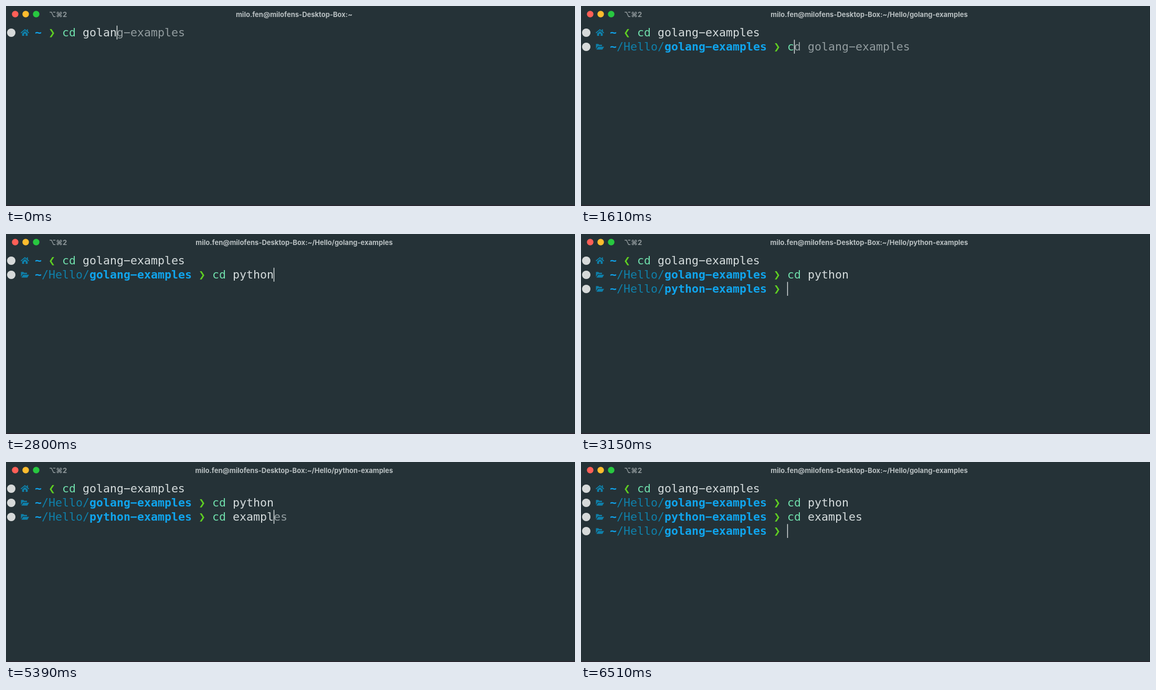
An HTML page with a canvas for the animation above (6580 ms loop, 1084 by 382 pixels).

```html
<!DOCTYPE html>
<html lang="en">
<head>
<meta charset="utf-8">
<title>Terminal</title>
<style>
  html, body { margin: 0; width: 100%; height: 100%; overflow: hidden; background: #253237; }
  canvas { display: block; }
</style>
</head>
<body>
<canvas id="stage" width="1084" height="382"></canvas>
<script>
const ctx = document.getElementById('stage').getContext('2d');
const LOOP = 6580, CELL = 13, LEFT = 3, TOP = 37, ROW = 27;
const MONO = '21.59px "DejaVu Sans Mono", "DejaVu Sans", monospace';
const UI = 'bold 13px Inter, "DejaVu Sans", sans-serif';
const HOST = 'milo.fen@milofens-Desktop-Box:~';
const C = {
  bg: '#253237', text: '#d5dcdd', hint: '#929c9f', cmd: '#70dfac', arrow: '#5fcf22',
  path: '#0f80aa', anchor: '#10a4ec', badge: '#d6d9d9', title: '#b9c0c2', tab: '#90999c'
};

// Each prompt: time of the new line, time the prompt shows, folder, and
// edits as [time, typed, hint].
const prompts = [
  { open: -1, ready: -1, dir: '', edits: [
    [0, 'cd golan', 'g-examples'], [70, 'cd golang', '-examples'], [840, 'cd golang-examples', '']
  ] },
  { open: 1120, ready: 1190, dir: 'golang-examples', edits: [
    [1540, 'c', 'd golang-examples'], [1680, 'cd', ' golang-examples'], [1820, 'cd ', 'golang-examples'],
    [2030, 'cd p', ''], [2240, 'cd py', ''], [2380, 'cd pyt', ''], [2450, 'cd pyth', ''],
    [2590, 'cd pytho', ''], [2730, 'cd python', '']
  ] },
  { open: 3080, ready: 3150, dir: 'python-examples', edits: [
    [3850, 'c', 'd python'], [3990, 'cd', ' python'], [4130, 'cd ', 'python'],
    [4550, 'cd e', 'xamples'], [4690, 'cd ex', 'amples'], [4760, 'cd exa', 'mples'],
    [4900, 'cd exam', 'ples'], [5040, 'cd examp', 'les'], [5110, 'cd exampl', 'es'],
    [5460, 'cd example', 's'], [5600, 'cd examples', '']
  ] },
  { open: 5950, ready: 6020, dir: 'golang-examples', edits: [] }
];
const VI_MODE = 840;

const colX = col => LEFT + col * CELL;
const rowY = row => TOP + row * ROW;

function dot(x, y, r, color) {
  ctx.fillStyle = color;
  ctx.beginPath();
  ctx.arc(x, y, r, 0, Math.PI * 2);
  ctx.fill();
}

function shape(color, ...points) {
  ctx.fillStyle = color;
  ctx.beginPath();
  points.forEach(([x, y]) => ctx.lineTo(x, y));
  ctx.closePath();
  ctx.fill();
}

// The terminal face has a wide hyphen, so the minus glyph stands in for it.
function write(str, col, row, color, bold) {
  ctx.font = (bold ? 'bold ' : '') + MONO;
  ctx.textAlign = 'left';
  ctx.fillStyle = color;
  ctx.fillText(str.replace(/-/g, '\u2212'), colX(col), rowY(row) + 21);
}

function label(str, x, align, color) {
  ctx.font = UI;
  ctx.textAlign = align;
  ctx.fillStyle = color;
  ctx.fillText(str, x, 20.5);
}

function house(row) {
  const y = rowY(row);
  ctx.strokeStyle = C.path;
  ctx.lineWidth = 1.8;
  ctx.beginPath();
  ctx.moveTo(28.5, y + 14.5);
  ctx.lineTo(36, y + 8.2);
  ctx.lineTo(43.5, y + 14.5);
  ctx.stroke();
  ctx.fillStyle = C.path;
  ctx.fillRect(39.6, y + 7.6, 2.2, 4);
  shape(C.path, [36, y + 11], [41.3, y + 15.4], [41.3, y + 20], [37.5, y + 20],
    [37.5, y + 16], [34.5, y + 16], [34.5, y + 20], [30.7, y + 20], [30.7, y + 15.4]);
}

function folder(row) {
  const y = rowY(row);
  shape(C.path, [28.5, y + 8.5], [33, y + 8.5], [34.6, y + 10], [40, y + 10],
    [40, y + 12.6], [32, y + 12.6], [28.5, y + 18]);
  shape(C.path, [32.7, y + 13.8], [44, y + 13.8], [40.7, y + 19.2], [29.3, y + 19.2]);
}

function drawPrompt(p, row, t) {
  dot(10, rowY(row) + 14, 8, C.badge);
  write('~', 4, row, C.anchor, true);
  if (p.dir) {
    folder(row);
    write('/Hello/', 5, row, C.path);
    write(p.dir, 12, row, C.anchor, true);
  } else {
    house(row);
  }
  write(!p.dir && t >= VI_MODE ? '❮' : '❯', p.dir ? 28 : 6, row, C.arrow);
}

function drawInput(p, row, t) {
  const start = p.dir ? 30 : 8;
  const edit = p.edits.filter(e => e[0] <= t).pop();
  if (!edit) return start;
  const [, typed, hint] = edit;
  write(typed.slice(0, 2), start, row, C.cmd);
  write(typed.slice(2), start + 2, row, C.text);
  write(hint, start + typed.length, row, C.hint);
  const back = !p.dir && t >= VI_MODE ? 1 : 0;
  return start + typed.length - back;
}

function drawWindow(dir) {
  ctx.fillStyle = C.bg;
  ctx.fillRect(0, 0, 1084, 382);
  ctx.fillStyle = '#2a2831';
  ctx.fillRect(0, 380, 1084, 2);
  ctx.fillStyle = '#1f2a2f';
  ctx.fillRect(1083, 0, 1, 380);
  ['#ff5f57', '#febc2e', '#28c840'].forEach((color, i) => dot(17.5 + i * 20, 15.5, 6.2, color));
  label('⌥⌘2', 82, 'left', C.tab);
  label(HOST + (dir ? '/Hello/' + dir : ''), 549, 'center', C.title);
}

function draw(t) {
  drawWindow(prompts.filter(p => p.ready <= t).pop().dir);
  let cursor = [0, 0];
  prompts.forEach((p, row) => {
    if (t < p.open) return;
    cursor = [0, row];
    if (t < p.ready) return;
    drawPrompt(p, row, t);
    cursor = [drawInput(p, row, t), row];
  });
  ctx.fillStyle = '#e2e6e6';
  ctx.fillRect(colX(cursor[0]) - 0.2, rowY(cursor[1]) + 0.5, 1.4, 26.5);
}

const begin = performance.now();
function tick() {
  draw((performance.now() - begin) % LOOP);
  requestAnimationFrame(tick);
}
tick();
</script>
</body>
</html>
```
